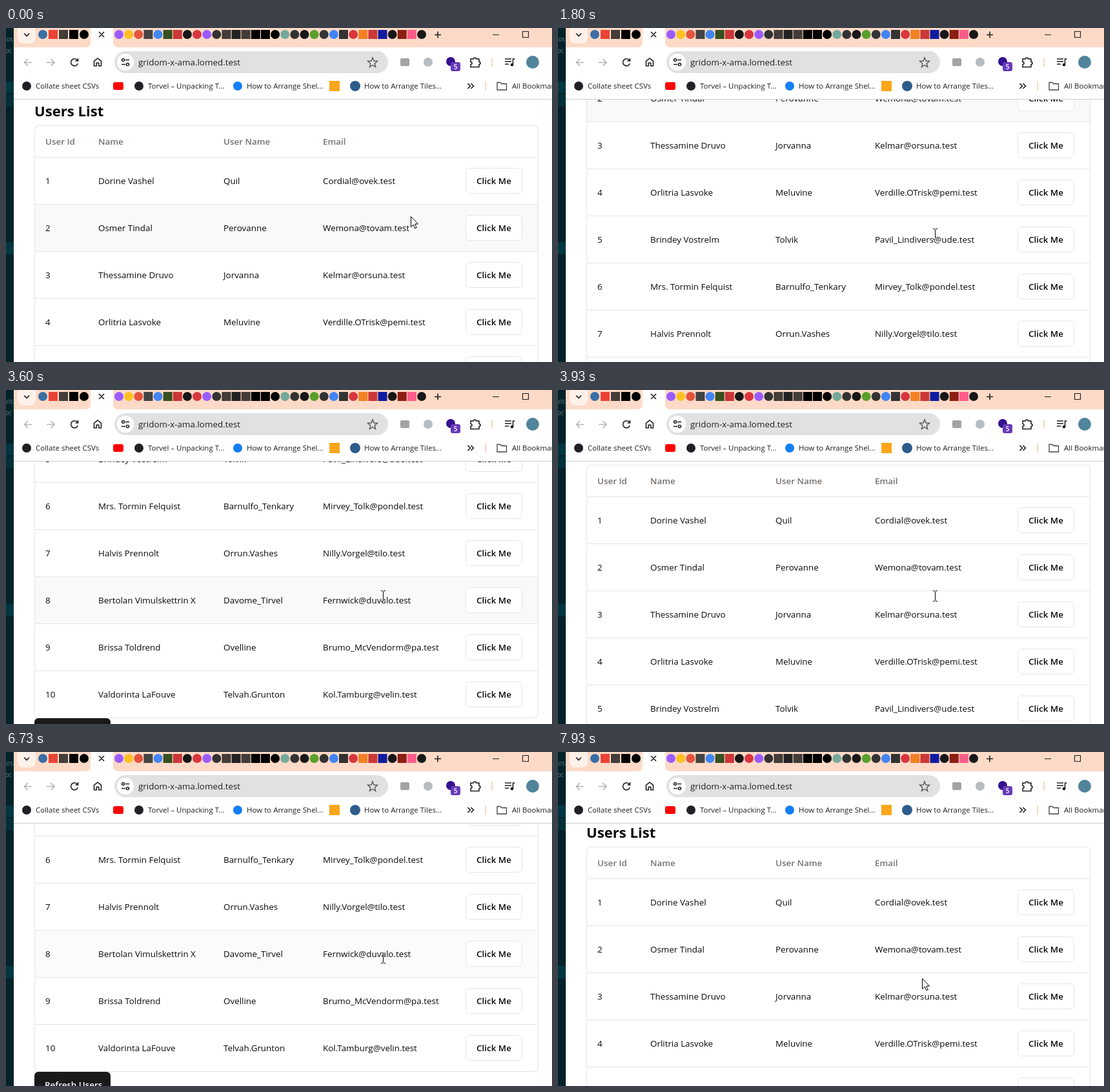
Write an HTML page that moves like this. It is 846 px wide and 518 px high and loops after 8000 ms.

```html
<!DOCTYPE html>
<html lang="en">
<head>
<meta charset="utf-8">
<title>Users List</title>
<style>
  html, body { margin: 0; width: 100%; height: 100%; overflow: hidden; background: #fff; }
  svg { display: block; font: 13.4px "Open Sans", "Noto Sans", sans-serif; fill: #0a0a0a; }
  .line { fill: none; stroke: #1f1f1f; stroke-width: 1.6; }
  .dim { stroke: #b4b4b4; }
  .thin { stroke-width: 1.1; }
  .border { stroke: #e5e5e5; }
  .bold { font-weight: 600; }
  .head { font-weight: 600; fill: #78716c; }
  .marks { font-size: 11.5px; fill: #1f1f1f; }
  #beam { fill: none; stroke: #fff; mix-blend-mode: difference; }
</style>
</head>
<body>
<svg width="846" height="518" viewBox="0 0 846 518">
  <clipPath id="view"><rect x="12" y="111" width="834" height="407"/></clipPath>
  <rect width="846" height="518" fill="#fff"/>

  <!-- editor behind the window -->
  <rect width="12" height="518" fill="#04222a"/>
  <path d="M0 83H12V101H0zM0 332H12V351H0z" fill="#023642"/>
  <path d="M0 103H12V121H0z" fill="#033039"/>
  <g fill="#60777b" font-size="10"><text x="-6" y="21">pos</text><text x="-6" y="39" font-style="italic">eac</text></g>

  <!-- tab strip -->
  <rect x="12" width="834" height="30" fill="#fcdac7"/>
  <path d="M18 0H46V14Q46 24 36 24H28Q18 24 18 14Z" fill="#fef1ea"/>
  <path d="M123 30Q131 30 131 22V0H166V22Q166 30 174 30Z" fill="#fff"/>
  <g id="tabs"></g>
  <path class="line" d="M28 8.5l4 4 4-4M144 6l8 8m0-8l-8 8M664 10.5h10m-5-5v10"/>
  <path class="line thin" d="M754 10.5h10M800.5 5.5h9v9h-9z"/>

  <!-- toolbar -->
  <path class="line dim" d="M40 53.5H28.5m5.5-5.5l-5.5 5.5 5.5 5.5M63 53.5H75m-5.5-5.5l5.5 5.5-5.5 5.5"/>
  <path class="line" d="M110.5 50a5.5 5.5 0 1 0 .8 5M111.5 47v4h-4M136.5 58.8V51.5l5.5-4.5 5.5 4.5v7.3h-3.8v-4.5h-3.4v4.5z"/>
  <rect x="168" y="36" width="424" height="34" rx="17" fill="#e2e1e2"/>
  <circle cx="185" cy="53" r="13" fill="#fff"/>
  <path class="line" d="M185 49.5h6M179 56.5h6"/>
  <g class="line"><circle cx="181.5" cy="49.5" r="2"/><circle cx="188.5" cy="56.5" r="2"/></g>
  <text x="205" y="58" fill="#1f1f1f">gridom-x-ama.lomed.test</text>
  <path class="line" style="stroke:#555;stroke-width:1.4" d="M568 46l2 5 5.5.4-4.2 3.6 1.3 5.4-4.6-2.9-4.6 2.9 1.3-5.4-4.2-3.6 5.5-.4z"/>
  <rect x="611" y="47" width="14" height="12" rx="2" fill="#a3a3a3"/>
  <circle cx="654" cy="53" r="7" fill="#b7bcc0"/>
  <circle cx="689" cy="52" r="7" fill="#35108f"/>
  <rect x="689" y="53" width="15" height="14" rx="3" fill="#673ab7"/>
  <text x="696.5" y="64" font-size="10" class="bold" text-anchor="middle" fill="#fff">5</text>
  <path class="line" d="M720 48h4.5a2 2 0 0 1 4 0h4.5v4.5a2 2 0 0 1 0 4v4h-13v-4a2 2 0 0 0 0-4z"/>
  <path d="M752 46h2v14h-2zM742 83h2v14h-2z" fill="#fad7c6"/>
  <path class="line" d="M773 48h10M773 52h10M773 56h6M785.5 57V48h3"/>
  <circle cx="784" cy="57" r="2.3"/>
  <circle cx="816" cy="53" r="10" fill="#4f849b"/>

  <!-- bookmarks -->
  <circle cx="32" cy="90" r="7" fill="#202124"/>
  <rect x="166" y="84" width="16" height="12" rx="3" fill="#f00"/>
  <circle cx="206" cy="90" r="7" fill="#202124"/>
  <circle cx="359" cy="90" r="7" fill="#147ef5"/>
  <rect x="501" y="82" width="16" height="16" fill="#f9a61a"/>
  <circle cx="541" cy="90" r="8" fill="#2d5c8c"/>
  <g class="marks">
    <text x="46" y="94">Collate sheet CSVs</text>
    <text x="220" y="94">Torvel – Unpacking T...</text>
    <text x="373" y="94">How to Arrange Shel...</text>
    <text x="555" y="94">How to Arrange Tiles...</text>
    <text x="784" y="94">All Bookmarks</text>
  </g>
  <path class="line" d="M715.5 86l4 4-4 4m5-8l4 4-4 4"/>
  <path class="line" style="stroke:#444;stroke-width:1.3" d="M761 84.5h5l2 2h7.5v9.5H761z"/>
  <path d="M12 110h834v1H12z" fill="#cdcdcd"/>

  <!-- page -->
  <g clip-path="url(#view)"><g id="page"></g></g>

  <path id="arrow" d="M.5.5V16.5L4.2 13 6.7 18.8 9.2 17.7 6.7 12H11.5Z" fill="#fff" stroke="#000"/>
  <path id="beam" d="M-3.5-8H-1L0-7 1-8H3.5M0-7V7M-3.5 8H-1L0 7 1 8H3.5"/>
</svg>
<script>
const $ = id => document.getElementById(id);

// Tab icons: "o" is round, "s" is square.
const icon = (spec, x) =>
  `<rect x="${x - 7}" y="3" width="14" height="14" rx="${spec[0] === 'o' ? 7 : 0}" fill="#${spec.slice(1)}"/>`;
const iconRow = (specs, x, step) => specs.split(' ').map((s, i) => icon(s, x + i * step)).join('');
$('tabs').innerHTML =
  iconRow('o3b6ea5 sea4335 s443c38 s000 o000', 57, 16) +
  iconRow('o9b5cff offc020 oe5533d s444 o4285f4 s38501f scb3837 o181717 od9363e o9b5cff o333 s443c38 ' +
    's222 s443c38 s000 s000 o000 o74aa9c o333 o181717 o5aa02c o333 o4285f4 s333 od9363e sf48024 ' +
    'scb3837 s101ca0 o181717 s8c1f11 sff5c8a o181717', 175, 15.13);

const users = `Dorine Vashel|Quil|Cordial@ovek.test
Osmer Tindal|Perovanne|Wemona@tovam.test
Thessamine Druvo|Jorvanna|Kelmar@orsuna.test
Orlitria Lasvoke|Meluvine|Verdille.OTrisk@pemi.test
Brindey Vostrelm|Tolvik|Pavil_Lindivers@ude.test
Mrs. Tormin Felquist|Barnulfo_Tenkary|Mirvey_Tolk@pondel.test
Halvis Prennolt|Orrun.Vashes|Nilly.Vorgel@tilo.test
Bertolan Vimulskettrin X|Davome_Tirvel|Fernwick@duvalo.test
Brissa Toldrend|Ovelline|Brumo_McVendorm@pa.test
Valdorinta LaFouve|Telvah.Grunton|Kol.Tamburg@velin.test`.split('\n').map(u => u.split('|'));

const columns = [61, 143, 337, 491], rowHeight = 73, rowTop = i => 201 + i * rowHeight;
const cells = (texts, y, cls) =>
  texts.map((s, i) => `<text x="${columns[i]}" y="${y}" class="${cls}">${s}</text>`).join('');

$('page').innerHTML =
  '<text x="44" y="137" font-size="22.1" font-weight="700">Users List</text>' +
  '<rect id="hover" x="45" width="779" height="72" fill="#f9f9f9"/>' +
  '<rect class="line thin border" x="44.5" y="151.5" width="780" height="779" rx="6"/>' +
  cells(['User Id', 'Name', 'User Name', 'Email'], 181, 'head') +
  users.map((user, i) => {
    const y = rowTop(i);
    return `<path class="border" d="M45 ${y - .5}H824"/>` +
      cells([i + 1, ...user], y + 41, '') +
      `<rect class="border" fill="#fff" x="712.5" y="${y + 16.5}" width="87" height="39" rx="6"/>` +
      `<text class="bold" x="756" y="${y + 41}" text-anchor="middle">Click Me</text>`;
  }).join('') +
  '<rect x="44" y="931" width="118" height="40" rx="6" fill="#1a1a1a"/>' +
  '<text class="bold" x="60" y="956" fill="#fff">Refresh Users</text>';

// Scroll offset as [tick, pixels], linear between points; 15 ticks per second.
const scroll = [[0, 0], [19, 0], [20, 13], [21, 62], [22, 100], [24, 100], [25, 113], [27, 201],
  [31, 405], [33, 435], [53, 435], [54, 422], [58, 52], [59, 35], [62, 35], [63, 22], [64, 4], [65, 0],
  [80, 0], [81, 13], [82, 140], [83, 300], [84, 405], [85, 435], [104, 435], [105, 422], [113, 62],
  [115, 35], [117, 35], [118, 22], [119, 4], [120, 0]];
const hovers = [[-9, 1], [47, 7], [72, 1], [101, 7]];                   // [tick, row]
const pointer = [[0, 627, 292, 'arrow'], [1, 601, 304, 'arrow'], [2, 590, 318.5, 'beam'],
  [4, 584.5, 319.5, 'beam'], [115, 564, 351, 'arrow']];                 // [tick, x, y, shape]

const latest = (list, tick) => list.findLast(p => p[0] <= tick);

function scrollAt(tick) {
  const i = scroll.findIndex(p => p[0] > tick);
  const [t0, y0] = scroll[i - 1], [t1, y1] = scroll[i];
  return Math.round(y0 + (y1 - y0) * (tick - t0) / (t1 - t0));
}

function draw(ms) {
  const tick = Math.floor((ms % 8000 + 5) * 0.015) % 120;
  $('page').setAttribute('transform', `translate(0 ${-scrollAt(tick)})`);

  const [since, row] = latest(hovers, tick);
  $('hover').setAttribute('y', rowTop(row));
  $('hover').setAttribute('opacity', Math.min(1, (tick - since + 2) / 3));

  const [, x, y, shape] = latest(pointer, tick);
  for (const id of ['arrow', 'beam']) {
    $(id).setAttribute('transform', `translate(${x} ${y})`);
    $(id).setAttribute('visibility', id === shape ? 'visible' : 'hidden');
  }
}

const start = performance.now();
(function loop() {
  draw(performance.now() - start);
  requestAnimationFrame(loop);
})();
</script>
</body>
</html>
```
